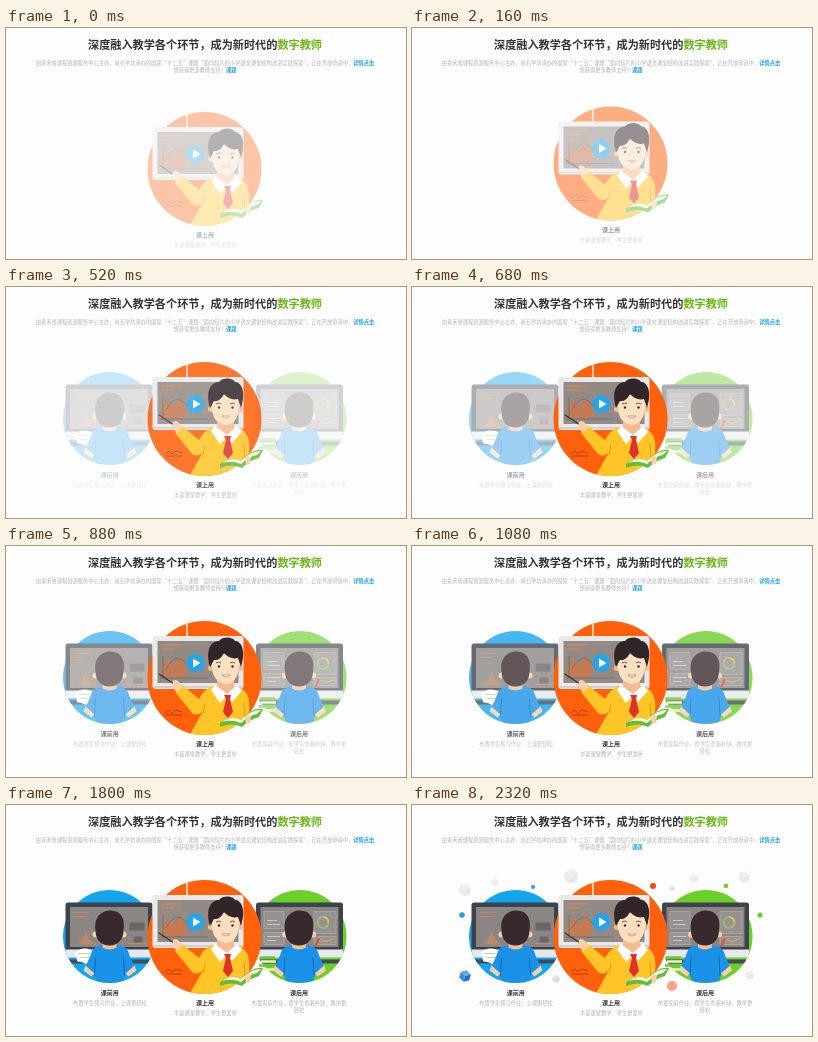
Animation, 400 px wide and 231 px high, one loop 3160 ms. Source, as an HTML page:

```html
<!DOCTYPE html>
<html lang="zh-CN">
<head>
<meta charset="utf-8">
<style>
html, body { margin: 0; width: 100%; height: 100%; overflow: hidden; background: #fdfdfd; }
svg { display: block; width: 400px; height: 231px; }
text { font: 5.26px "Noto Sans CJK SC", "Noto Sans CJK", sans-serif; text-anchor: middle; fill: #b2b2b2; }
.title { font-size: 11.15px; font-weight: 700; fill: #333; }
.title tspan { fill: #66b80e; }
.link { font-weight: 700; fill: #1e9fe8; }
.label { font-size: 6px; font-weight: 700; fill: #333; }
</style>
</head>
<body>
<svg viewBox="0 0 400 231">
  <defs>
    <clipPath id="disc"><path d="M130 60H270V140H130Z"/><circle cx="198.5" cy="132" r="57"/></clipPath>
    <clipPath id="seat"><path d="M-60 -60H60V12H-60Z"/><circle r="46.5"/></clipPath>
    <g id="monitor" clip-path="url(#seat)">
      <rect x="-44" y="-34" width="87" height="48" rx="2.5" fill="#3d434d"/>
      <rect x="-39.5" y="-29.5" width="78" height="40" fill="#8b8684"/>
      <path d="M-44 13H43V19Q43 21 41 21H-42Q-44 21-44 19Z" fill="#e6e9eb"/>
      <path d="M-45 23H45V27H-45Z" fill="#454b55"/>
    </g>
    <g id="boy" clip-path="url(#seat)">
      <path d="M-9 9Q-17 10-19 19L-24 30-15 38-13 46Q0 48 14 46L16 38 25 30 20 19Q18 10 10 9Z" fill="#1992e8"/>
      <path d="M-14 21L-15 39M14 21L15 39" stroke="#0b69b8"/>
      <path d="M-24 29L-15 37-18 40-26 34ZM25 29L16 37 19 40 27 34Z" fill="#f8cda7"/>
      <path d="M-7 4H7V11Q0 15-7 11Z" fill="#f2bd93"/>
      <circle cx="-14" cy="-2" r="3" fill="#f8cda7"/>
      <circle cx="14" cy="-2" r="3" fill="#f8cda7"/>
      <path d="M-14 -6C-16 -18-9 -26 1 -26C12 -26 16 -17 14 -6C14 3 8 9 0 9S-14 3-14 -6Z" fill="#382a2c"/>
    </g>
  </defs>

  <text class="title" x="199" y="20.700">深度融入教学各个环节，成为新时代的<tspan>数字教师</tspan></text>
  <text x="199" y="37">由青禾省课程资源服务中心主办，岚石学坊承办的国家“十二五”课题“面向短片的小学语文课堂结构改进实践探索”，正在开放申请中，<tspan class="link">详情点击</tspan></text>
  <text x="199" y="44.300">想获得更多教师支持？<tspan class="link">课题</tspan></text>

  <g id="bits"></g>

  <g id="sides">
    <g transform="translate(103.500 131.500)">
      <circle r="46.5" fill="#14a5ef"/>
      <use href="#monitor"/>
      <path d="M-35 8Q-27 7-24 -6Q-20 7-12 8Z" fill="#b98a6b"/>
      <path d="M-36 -24H-20M-36 -20H-24M18 7H36" stroke="#c08a66"/>
      <path d="M20 -14H35V-6H20ZM24 0H33V6H24Z" fill="#6a6566"/>
      <path d="M-35 16Q-28 10-19 13L-14 27-20 30Q-26 25-32 25Z" fill="#fff"/>
      <path d="M-31 17L-20 17M-29 21L-18 21" stroke="#b9d9a0"/>
      <use href="#boy"/>
    </g>
    <g transform="translate(294 131.500)">
      <circle r="46.5" fill="#6bcf29"/>
      <use href="#monitor"/>
      <path d="M-36 -25H-16V-8H-36ZM-36 -4H-16V8H-36ZM14 -25H36V-3H14ZM14 0H36V8H14Z" fill="#969291" stroke="#b5b1af" stroke-width=".7"/>
      <path d="M-33 -12H-20M-33 -16H-23M-33 0H-20M-33 4H-24" stroke="#c9c5c2"/>
      <circle cx="23" cy="-14" r="5.500" fill="none" stroke="#9cc46a" stroke-width="1.500"/>
      <path d="M23 -19.500A5.500 5.500 0 0 1 28.500 -14" fill="none" stroke="#f0c443" stroke-width="1.500"/>
      <path d="M16 6L21 3 26 5 34 2" stroke="#e8b249" fill="none"/>
      <path d="M-40 21H-25M-41 29H-25" stroke="#6bc83b" stroke-width="2.500"/>
      <path d="M-39 25H-24M-40 33H-24" stroke="#f7f3c8" stroke-width="2.500"/>
      <g transform="translate(-1 0)"><use href="#boy"/></g>
      <path d="M15 10L19 2" stroke="#e5482f" stroke-width="2"/>
    </g>
    <text class="label" x="103.800" y="190.300">课前用</text>
    <text x="104" y="199.800">布置学生预习作业，上课更轻松</text>
    <text class="label" x="293" y="190.300">课后用</text>
    <text x="293" y="199.800">布置家庭作业，帮学生查漏补缺，教学更</text>
    <text x="293" y="207">轻松</text>
  </g>

  <g id="main">
    <circle cx="198.500" cy="132" r="57" fill="#ff600b"/>
    <path d="M181 77V90" stroke="#ffc7a6" stroke-width="2"/>
    <rect x="146.500" y="90" width="91" height="53" rx="3" fill="#eae9e9"/>
    <rect x="151.500" y="95" width="81" height="42" fill="#938a85"/>
    <path d="M155 99H176M155 103H168" stroke="#c98a5c" stroke-width="1.300"/>
    <path d="M154 131L160 113 168 119 174 110 181 123 178 132Z" fill="#c47a52"/>
    <path d="M154 132H202M157 110V132M160 123Q172 101 184 124" fill="none" stroke="#6f6866" stroke-width=".8"/>
    <path d="M148 141H237" stroke="#c6c9cb" stroke-width="1.500"/>
    <path d="M159 167L163 164 166 167 170 164 176 166M160 169H176" fill="none" stroke="#b83d10"/>
    <circle cx="189.500" cy="117" r="9" fill="#24a4e9"/>
    <path d="M187 112.500V121.500L194.500 117Z" fill="#fff"/>

    <g clip-path="url(#disc)">
      <path d="M207 140Q198 143 193 153L176 139 169 146 186 167Q192 171 197 165L182 192H242L243 166Q245 146 234 142Z" fill="#ffc526"/>
      <path d="M199 158L197 168M238 156L239 174" stroke="#e39a0d" fill="none"/>
      <path d="M211 132H228V144L221 152 211 144Z" fill="#f4bd91"/>
      <path d="M209 139L221 148 231 139 236 145 226 156 221 150 214 157 205 144Z" fill="#fff"/>
      <path d="M218 149H225L224 153 227 166 222 172 217 166 220 153Z" fill="#df302b"/>
    </g>
    <path d="M153 128L171 140" stroke="#30343b" stroke-width="1.300" stroke-linecap="round"/>
    <path d="M167 135Q170 132 174 137L177 141 171 146 166 141Z" fill="#fcd0a6"/>
    <circle cx="205" cy="122" r="3" fill="#f3bd92"/>
    <circle cx="234" cy="122" r="3" fill="#f3bd92"/>
    <path d="M206 108H233V122Q231 137 220 138 207 136 206 122Z" fill="#fee0c0"/>
    <path d="M204 121C199 104 205 95 213 95C218 89 228 92 229 95C238 96 239 109 235 121L232 112Q224 114 218 107Q214 115 208 114Z" fill="#30262a"/>
    <path d="M210 117Q213 115 215 117M224 117Q227 115 229 117" fill="none" stroke="#493430" stroke-width=".8"/>
    <circle cx="213" cy="120.500" r="1.200" fill="#372b2b"/>
    <circle cx="226.500" cy="120.500" r="1.200" fill="#372b2b"/>
    <path d="M216 129Q220 133 224 129Z" fill="#fff" stroke="#b65f4b" stroke-width=".6"/>
    <path d="M214 177Q224 169 235 174Q246 161 257 163L253 171Q244 173 236 181Q226 176 214 181Z" fill="#62bd37"/>
    <path d="M216 176Q226 169 235 174Q246 163 255 164L251 168Q243 169 235 177Q226 173 216 176Z" fill="#f5faeb"/>
    <path d="M239 172Q240 167 245 170L244 177 240 178Z" fill="#fcd0a6"/>

    <text class="label" x="199" y="200.300">课上用</text>
    <text x="199.500" y="210">丰富课堂教学，学生更爱听</text>
  </g>
</svg>
<script>
const LOOP = 3160;
const $ = id => document.getElementById(id);
const clamp = v => Math.max(0, Math.min(1, v));
const easeOut = (p, power) => 1 - (1 - clamp(p)) ** power;

const dot = fill => `<circle r="1" fill="${fill}"/>`;
const cube = fill => [0, 120, 240].map((turn, i) =>
  `<path d="M0 0L.87 -.5V.5L0 1Z" transform="rotate(${turn + 15})" fill="${fill}" opacity="${1 - i * .18}"/>`).join('');

// shape, colour, x, y, radius, centre x of the disc it leaves
const bits = [
  [cube, '#e6e6e6', 53, 85, 6.5, 104], [cube, '#e9e9e9', 83, 77, 4, 104],
  [cube, '#e6e6e6', 159, 71, 7.5, 199], [dot, '#2c9fe6', 121, 82, 2, 104],
  [dot, '#2c9fe6', 50, 110, 2.8, 104], [cube, '#1673cf', 53, 171, 6, 104],
  [cube, '#d5d5d5', 144, 174, 4, 104], [dot, '#ee4a22', 241, 81, 3, 199],
  [cube, '#dcdcdc', 260, 83, 3, 199], [cube, '#e9e9e9', 282, 73, 5, 294],
  [dot, '#6bcf29', 314, 81, 2.3, 294], [cube, '#e6e6e6', 332, 72, 6, 294],
  [dot, '#6bcf29', 348, 110, 2.6, 294], [cube, '#e9e9e9', 338, 170, 5, 294],
  [dot, '#ffa184', 260, 181, 5, 199]
].map(([shape, fill, x, y, r, cx]) => {
  $('bits').insertAdjacentHTML('beforeend', `<g>${shape(fill)}</g>`);
  return { node: $('bits').lastChild, x, y, r, cx };
});

function draw(now) {
  const t = now % LOOP;
  $('main').setAttribute('opacity', clamp(.35 + t / 1050));
  $('main').setAttribute('transform', `translate(0 ${9 * (1 - easeOut(t / 600, 3))})`);
  $('sides').setAttribute('opacity', easeOut((t - 360) / 1340, 2));

  const out = easeOut((t - 1800) / 520, 2);
  $('bits').setAttribute('opacity', out);
  for (const { node, x, y, r, cx } of bits) {
    const k = .7 + .3 * out;
    node.setAttribute('transform',
      `translate(${cx + (x - cx) * k} ${132 + (y - 132) * k}) scale(${r})`);
  }
  requestAnimationFrame(draw);
}
draw(performance.now());
</script>
</body>
</html>
```
